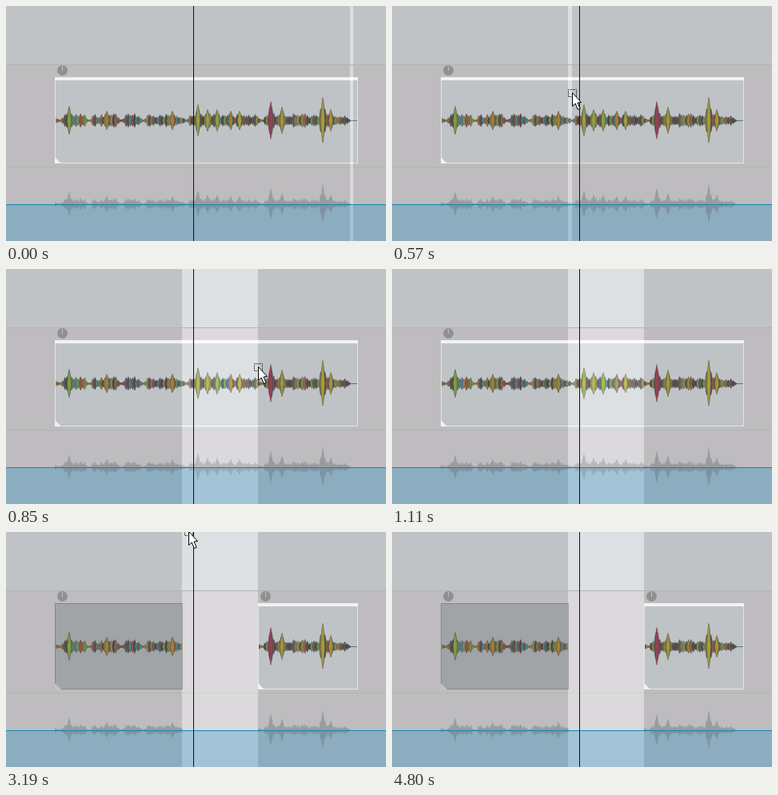
These frames come from a looping animation (475x294 px, 5170 ms). An HTML page with a canvas:

```html
<!DOCTYPE html>
<html>
<head>
<meta charset="utf-8">
<style>
html, body { margin: 0; width: 100%; height: 100%; overflow: hidden; background: #bebcbe; }
canvas { display: block; }
</style>
</head>
<body>
<canvas id="stage" width="475" height="294"></canvas>
<script>
const ctx = document.getElementById('stage').getContext('2d');
const LOOP = 5170, DRAG_START = 570, DRAG_END = 850, CUT = 2290;

// Loudest moments of the sound (x, half height, hue) and the quiet places between
const peaks = [
  [79, 18, 80], [126, 12, 40], [208, 12, 42], [240, 20, 62], [252, 14, 65], [264, 14, 70],
  [281, 12, 40], [292, 12, 60], [331, 24, 345], [345, 17, 55], [396, 29, 60], [406, 14, 55]
];
const pauses = [67, 104, 144, 171, 225, 320, 431];

// Pointer poses, each held until the next one
const pointers = [
  [0], [150, 'arrow', 196, 35], [300, 'marquee', 217, 108], [450, 'marquee', 220, 108],
  [DRAG_START, 'marquee', 225, 108], [720, 'marquee', 252, 108], [DRAG_END, 'marquee', 315, 122],
  [990, 'arrow', 220, 46], [1110],
  [3190, 'marquee', 228, -1], [3340, 'marquee', 210, 83], [3460, 'marquee', 231, 83],
  [3610, 'marquee', 400, -1], [3730],
  [4540, 'resize', 295, 104], [4680, 'marquee', 353, 241], [4800]
];
const pointerAt = t => pointers.filter(p => p[0] <= t).pop();

function seeded(seed) {
  return () => (seed = seed * 16807 % 2147483647) / 2147483647;
}

function makeGrains() {
  const random = seeded(4711), grains = [];
  for (let x = 62; x < 430; x += 2.2 + random()) {
    const calm = Math.min(...pauses.map(p => Math.abs(x - p)));
    const base = (4 + 5 * random()) * Math.min(1, calm / 6);
    const slopes = peaks.map(([px, amp]) => amp * (0.85 - Math.abs(x - px) / 8));
    const color = random() < 0.45 ? `hsl(30 4% ${27 + 10 * random()}%)`
      : `hsl(${random() < 0.12 ? 185 : 5 + 80 * random()} 34% 42%)`;
    grains.push({ x, amp: Math.max(1, base, ...slopes), w: 2.1, color });
  }
  for (const [x, amp, hue] of peaks) grains.push({ x, amp, w: 2.6, color: `hsl(${hue} 45% 43%)` });
  return grains;
}
const grains = makeGrains();

function rect(color, x, y, w, h) {
  ctx.fillStyle = color;
  ctx.fillRect(x, y, w, h);
}

function polygon(points) {
  ctx.beginPath();
  points.forEach(([x, y]) => ctx.lineTo(x, y));
  ctx.closePath();
}

function within(x, right, draw) {
  ctx.save();
  ctx.beginPath();
  ctx.rect(x, 0, right - x, 294);
  ctx.clip();
  draw();
  ctx.restore();
}

function addGrain(path, { x, amp, w }, y, scale = 1) {
  const h = amp * scale;
  path.moveTo(x - w, y);
  path.lineTo(x - w * 0.5, y - h * 0.7);
  path.lineTo(x, y - h);
  path.lineTo(x + w * 0.5, y - h * 0.7);
  path.lineTo(x + w, y);
  path.lineTo(x + w * 0.5, y + h * 0.65);
  path.lineTo(x, y + h * 0.95);
  path.lineTo(x - w * 0.5, y + h * 0.65);
  path.closePath();
}

function wave() {
  rect('#557a7c', 62, 143, 377, 1);
  ctx.lineWidth = 0.5;
  ctx.strokeStyle = '#4a4a48';
  for (const grain of grains) {
    const path = new Path2D();
    addGrain(path, grain, 143.5);
    ctx.fillStyle = grain.color;
    ctx.fill(path);
    ctx.stroke(path);
  }
}

function ghost() {
  const path = new Path2D();
  grains.forEach(grain => addGrain(path, grain, 248, 0.87));
  path.rect(62, 247, 368, 2);
  ctx.fillStyle = 'rgba(108,116,121,.45)';
  ctx.fill(path);
}

function knob(x) {
  ctx.fillStyle = '#8f9091';
  ctx.beginPath();
  ctx.arc(x + 9.5, 80.5, 6.5, 0, 7);
  ctx.fill();
  rect('#bfc0c1', x + 9, 75, 1, 6);
}

function clip(x, right, active) {
  const edge = active ? '#f1f2f3' : '#858889';
  rect(active ? '#bfc3c5' : '#a0a4a6', x, 89, right - x, 108);
  within(x, right, wave);
  ctx.lineWidth = 1;
  ctx.strokeStyle = active ? '#e3e5e6' : edge;
  ctx.strokeRect(x + 0.5, 89.5, right - x - 1, 107);
  if (active) rect(edge, x, 89, right - x, 4);
  ctx.fillStyle = active ? edge : '#c0c2c3';
  polygon([[x, 189], [x + 8, 197], [x, 197]]);
  ctx.fill();
  knob(x);
}

function outlined(points) {
  polygon(points);
  ctx.fillStyle = '#fff';
  ctx.strokeStyle = '#000';
  ctx.lineWidth = 1;
  ctx.fill();
  ctx.stroke();
}

const arrow = () => outlined([[0.5, 0.5], [0.5, 17.5], [4.2, 14], [7.3, 21.5], [10.2, 20.3], [7, 13], [11.5, 12.5]]);

const drawPointer = {
  arrow() {
    ctx.scale(0.9, 0.87);
    arrow();
  },
  marquee() {
    ctx.strokeStyle = '#000';
    ctx.lineWidth = 1;
    ctx.setLineDash([1, 1]);
    ctx.lineDashOffset = 0.5;
    ctx.strokeRect(-4.5, -3.5, 10, 9);
    ctx.setLineDash([]);
    arrow();
  },
  resize() {
    outlined([[0.5, 5.5], [6.5, 0.5], [6.5, 4], [20.5, 4], [20.5, 0.5], [26.5, 5.5],
      [20.5, 10.5], [20.5, 7], [6.5, 7], [6.5, 10.5]]);
  }
};

function selection(t) {
  // The drag pulls the right edge along; before it, a narrow earlier range shows
  const dragged = t >= DRAG_START;
  const from = dragged ? 220 : 430;
  const to = dragged ? pointerAt(Math.min(t, DRAG_END))[2] : 434;
  ctx.globalCompositeOperation = 'lighter';
  rect('#1d1d1d', from, 0, to - from, 248);
  rect('#171717', from, 248, to - from, 46);
  ctx.globalCompositeOperation = 'source-over';
}

function render(t) {
  const clips = t < CUT ? [[61, 440, true]] : [[61, 221, false], [315, 440, true]];
  rect('#bfc3c5', 0, 0, 475, 73);
  rect('#bebcbe', 0, 73, 475, 175);
  rect('#b5b4b5', 0, 201, 475, 1);
  rect('#8cacc0', 0, 248, 475, 46);

  for (const [x, right, active] of clips) {
    clip(x, right, active);
    within(x, right, ghost);
  }
  selection(t);
  rect('#b2b3b3', 0, 73, 475, 1);
  rect('#1683b2', 0, 248, 475, 1);
  rect('#111', 234, 0, 1, 294);

  const [, kind, x, y] = pointerAt(t);
  if (kind) {
    ctx.save();
    ctx.translate(x, y);
    drawPointer[kind]();
    ctx.restore();
  }
}

const start = performance.now();
function tick() {
  render((performance.now() - start) % LOOP);
  requestAnimationFrame(tick);
}
tick();
</script>
</body>
</html>
```
